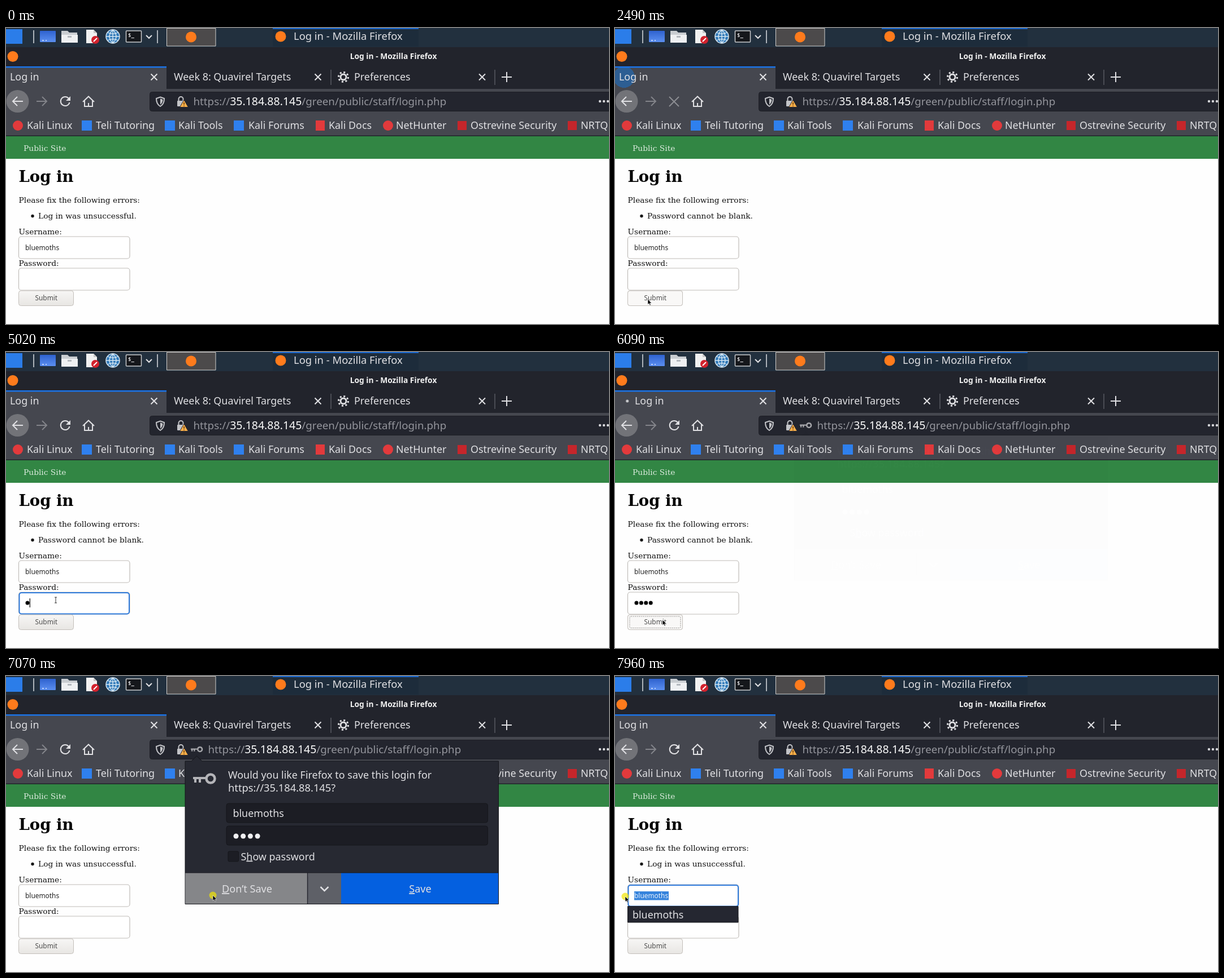
Animation, 1067 px wide and 525 px high, one loop 8 s. Source, as an HTML page:

```html
<!DOCTYPE html>
<html lang="en">
<head>
<meta charset="utf-8">
<title>Log in</title>
<style>
html, body { margin: 0; width: 100%; height: 100%; overflow: hidden; background: #fefefe; }
svg { display: block; width: 100%; height: 100%; }
text { font: 17.9px "Noto Sans", sans-serif; fill: #e0e0e3; white-space: pre; }
.page text { font: 13.78px "DejaVu Serif", serif; fill: #111; }
.page .ctl { font: 11.9px "Noto Sans", sans-serif; fill: #222; }
.page .h1 { font-size: 27.5px; font-weight: bold; fill: #000; }
.url { font-size: 18.75px; fill: #94959c; }
.ip { font-size: 19.5px; fill: #fafafa; }
.u { text-decoration: underline; }
.mid { text-anchor: middle; }
.line { fill: none; stroke: #e0e0e3; stroke-width: 2; }
.field { fill: #fff; stroke: #bfbcb8; stroke-width: 1.2; }
.ring { fill: none; stroke: #2f7bdc; stroke-width: 2; }

/* One loop is 8 s: 1% = 80 ms. Switches jump, motion is linear. */
.sw { animation: 8s step-end infinite; }
.mv { animation: 8s linear infinite; }
.fail { animation-name: fail; }
.blank { animation-name: blank; }
.hover { animation-name: hover; }
.btnfocus { animation-name: btnfocus; }
.pwfocus { animation-name: pwfocus; }
.caret { animation-name: caret; }
.d1 { animation-name: d1; }
.d2 { animation-name: d2; }
.d3 { animation-name: d3; }
.d4 { animation-name: d4; }
.stop { animation-name: stop; }
.reload { animation-name: reload; }
.busy { animation-name: busy; }
.spin { animation-name: spin; }
.label { animation-name: label; }
.burst { animation-name: burst; }
.popup { animation-name: popup; }
.key { animation-name: key; }
.shift { animation-name: shift; }
.decline { animation-name: decline; }
.userfocus { animation-name: userfocus; }
.list { animation-name: list; }
.select { animation-name: select; }
.pointer { animation-name: pointer; }
.shown { animation-name: shown; }
.arrow { animation-name: arrow; }
.beam { animation-name: beam; }
.press { animation-name: press; }

@keyframes fail { 0%, 78.75%, 100% { opacity: 1 } 30.25% { opacity: 0 } }
@keyframes blank { 0%, 78.75%, 100% { opacity: 0 } 30.25% { opacity: 1 } }
@keyframes hover { 0%, 36.8%, 79.6%, 100% { opacity: 0 } 18.6%, 73.4% { opacity: 1 } }
@keyframes btnfocus { 0%, 78.75%, 100% { opacity: 0 } 74.375% { opacity: 1 } }
@keyframes pwfocus { 0%, 74.375%, 100% { opacity: 0 } 49.375% { opacity: 1 } }
@keyframes caret {
  0% { transform: none }
  62.75% { transform: translateX(8px) }
  64.375% { transform: translateX(16.4px) }
  66.875% { transform: translateX(24.8px) }
  68.5%, 100% { transform: translateX(33.2px) }
}
@keyframes d1 { 0%, 78.75%, 100% { opacity: 0 } 62.75% { opacity: 1 } }
@keyframes d2 { 0%, 78.75%, 100% { opacity: 0 } 64.375% { opacity: 1 } }
@keyframes d3 { 0%, 78.75%, 100% { opacity: 0 } 66.875% { opacity: 1 } }
@keyframes d4 { 0%, 78.75%, 100% { opacity: 0 } 68.5% { opacity: 1 } }
@keyframes stop { 0%, 39.25%, 100% { opacity: 0 } 27.625% { opacity: 1 } }
@keyframes reload { 0%, 39.25%, 100% { opacity: 1 } 27.625% { opacity: 0 } }
@keyframes busy { 0%, 30.25%, 78.75%, 100% { opacity: 0 } 27.625%, 76.125% { opacity: 1 } }
@keyframes label { 0%, 30.25%, 78.75%, 100% { transform: none } 27.625%, 76.125% { transform: translateX(28px) } }
@keyframes spin {
  0%, 27.6%, 30.3%, 76.1% { transform: translateX(13px) }
  29%, 77.875%, 78.75% { transform: none }
  100% { transform: translateX(13px) }
}
@keyframes burst {
  0%, 30.24%, 36.5%, 78.74%, 83%, 100% { opacity: 0; transform: scale(.3) }
  30.25%, 78.75% { opacity: .45; transform: scale(.3) }
  31.125%, 79.6% { opacity: .39; transform: scale(.97) }
  32%, 80.4% { opacity: .37; transform: scale(1.1) }
  36.4%, 82.9% { opacity: 0; transform: scale(12) }
}
@keyframes popup { 0%, 76.125%, 91%, 100% { opacity: 0 } 77.4%, 89.25% { opacity: 1 } }
@keyframes key { 0%, 91%, 100% { opacity: 0 } 76.125% { opacity: 1 } }
@keyframes shift { 0%, 91%, 100% { transform: none } 76.125% { transform: translateX(26px) } }
@keyframes decline { 0%, 100% { opacity: 0 } 85% { opacity: 1 } }
@keyframes userfocus { 0% { opacity: 0 } 95.25%, 100% { opacity: 1 } }
@keyframes list { 0% { opacity: 0 } 96.75%, 100% { opacity: 1 } }
@keyframes select { 0%, 95.25% { transform: translateX(61px) } 98.5%, 100% { transform: none } }
@keyframes shown { 0% { opacity: 0 } 3%, 100% { opacity: 1 } }
@keyframes arrow { 0%, 72.6%, 98.5%, 100% { opacity: 1 } 42%, 91% { opacity: 0 } }
@keyframes beam { 0%, 72.6%, 98.5%, 100% { opacity: 0 } 42%, 91% { opacity: 1 } }
@keyframes press {
  0%, 27.625%, 51.125%, 76.125%, 89.25% { opacity: 0 }
  25.875%, 49.375%, 74.375%, 88.375%, 95.25%, 100% { opacity: .7 }
}
@keyframes pointer {
  0%, 3% { transform: translate(953px, 518px) }
  6.5% { transform: translate(520px, 496px) }
  9.5% { transform: translate(230px, 478px) }
  12.5%, 15.7% { transform: translate(139px, 475px) }
  15.75%, 16.625% { transform: translate(143px, 485px) }
  19.5% { transform: translate(104px, 488px) }
  25%, 35.5% { transform: translate(58px, 481px) }
  40% { transform: translate(84px, 430px) }
  45%, 45.875% { transform: translate(95px, 398px) }
  49.375%, 71.75% { transform: translate(88px, 440px) }
  74%, 78.75% { transform: translate(84px, 475px) }
  81.375% { transform: translate(160px, 405px) }
  86.5% { transform: translate(362px, 386px) }
  88.375%, 89.25% { transform: translate(366px, 389px) }
  91%, 93.5% { transform: translate(150px, 391px) }
  95.25% { transform: translate(95px, 390px) }
  98.5% { transform: translate(34px, 391px) }
  99.4%, 100% { transform: translate(18px, 391px) }
}
</style>
</head>
<body>
<svg viewBox="0 0 1067 525" preserveAspectRatio="none">
<defs>
  <linearGradient id="btn" x2="0" y2="1"><stop stop-color="#f7f6f5"/><stop offset="1" stop-color="#e8e6e3"/></linearGradient>
  <linearGradient id="desk" x2="0" y2="1"><stop stop-color="#2f62cf"/><stop offset="1" stop-color="#5b8ff0"/></linearGradient>
  <clipPath id="tab"><path d="M0 70H284V108H0Z"/></clipPath>
  <clipPath id="sel"><rect class="mv select" x="34" y="380" width="61" height="20"/></clipPath>
  <path id="x" d="M-5.5-5.5L5.5 5.5M5.5-5.5L-5.5 5.5"/>
  <g id="keyicon" fill="none" stroke="#b4b4b8">
    <circle cx="31" cy="0" r="7.5" stroke-width="4.5"/>
    <path d="M0-1H22M4-1V7M12-1V7" stroke-width="4"/>
  </g>
</defs>

<!-- desktop panel -->
<path fill="#22303e" d="M0 0H1067V34H0Z"/>
<path fill="#1d2c3b" d="M472 0H730V33H472Z"/>
<path fill="#1c6ad0" d="M472 0H730V2H472Z"/>
<path fill="#2b7de9" d="M0 2H29V28H0Z"/>
<path stroke="#aeb4ba" stroke-width="2" d="M49 4V27M268 4V27"/>
<rect x="60" y="5" width="28" height="20" rx="1" fill="url(#desk)"/>
<path stroke="#dce7ff" stroke-width="1.5" d="M64 22H67M70 22H72"/>
<path fill="#c9cdd1" d="M98 5H109L112 8H126V26H98Z"/>
<path fill="#eef0f2" d="M98 12H127V26H98Z"/>
<path fill="#b3b8bd" d="M109 14H116V17H109Z"/>
<path fill="#f1f1f1" d="M142 3H155L161 9V27H142Z"/>
<path fill="#c7c7c7" d="M155 3V9H161Z"/>
<circle cx="158" cy="21" r="7" fill="#d2222d"/>
<path stroke="#fff" stroke-width="2" d="M155 24L161 18"/>
<circle cx="189" cy="15" r="12" fill="#2f78b8" stroke="#d5e6f2" stroke-width="1.5"/>
<path class="line" style="stroke:#d5e6f2;stroke-width:1.4" d="M177 15H201M189 3V27M180 8Q189 13 198 8M180 22Q189 17 198 22M189 3Q177 15 189 27M189 3Q201 15 189 27"/>
<rect x="212.5" y="5" width="27" height="20" rx="1" fill="#15171b" stroke="#c9cbce" stroke-width="1.5"/>
<text x="216" y="16" style="font:bold 9px 'Noto Sans Mono',monospace">$_</text>
<path class="line" d="M248 13L253 18L258 13"/>
<path fill="#4c4a4b" stroke="#d0cfcd" d="M284.5 .5H371V32H284.5Z"/>
<g fill="#ff7b1c">
  <circle cx="327.5" cy="16" r="9.5"/>
  <circle cx="486" cy="15" r="9.5"/>
</g>
<text x="509" y="21" style="font-size:18.4px">Log in - Mozilla Firefox</text>

<!-- window title and tabs -->
<path fill="#22242c" d="M0 34H1067V108H0Z"/>
<circle cx="12" cy="50.5" r="9.5" fill="#ff7b1c"/>
<text class="mid" x="685.5" y="55.3" style="font-size:13.8px;font-weight:bold;fill:#f1f1f1">Log in - Mozilla Firefox</text>
<path fill="#45474f" d="M0 69H284V108H0Z"/>
<path fill="#1a73e8" d="M0 68H284V70.5H0Z"/>
<g clip-path="url(#tab)">
  <g transform="translate(16 87)"><circle class="mv burst" r="19.5" fill="#0a84ff"/></g>
</g>
<g class="sw busy"><circle class="mv spin" cx="9" cy="87" r="2.5" fill="#c9cacd"/></g>
<text class="sw label" x="7" y="93">Log in</text>
<text x="297" y="93">Week 8: Quavirel Targets</text>
<text x="616" y="93">Preferences</text>
<g class="line">
  <use href="#x" x="262" y="87"/>
  <use href="#x" x="552" y="87"/>
  <use href="#x" x="842.5" y="87"/>
  <path d="M877 87H895M886 78V96"/>
  <path stroke="#585a62" stroke-width="1.5" d="M575 74V101M865 74V101"/>
  <circle cx="597" cy="87" r="5" stroke-width="3"/>
  <circle cx="597" cy="87" r="8.5" stroke-width="3" stroke-dasharray="3 3.676"/>
</g>

<!-- navigation -->
<path fill="#45474f" d="M0 108H1067V191H0Z"/>
<circle cx="20.5" cy="130" r="20" fill="#727378"/>
<path class="line" d="M30 130H12M20 122L12 130L20 138"/>
<path class="line" style="stroke:#83848a" d="M54 130H72M64 122L72 130L64 138"/>
<g class="sw reload">
  <path class="line" d="M111 125A8 8 0 1 0 112.5 132"/>
  <path fill="#e0e0e3" d="M114 121V129H106Z"/>
</g>
<g class="sw stop"><path class="line" style="stroke:#8d8e93" d="M96 122L113 139M113 122L96 139"/></g>
<path class="line" d="M136 131L146 121.5L156 131M139 129V139H153V129M146 139V133"/>
<rect x="254.5" y="113.5" width="830" height="34" rx="4" fill="#23252e" stroke="#1d1e25"/>
<path class="line" style="stroke:#c3c4c8" d="M273 122.5L280 125Q280 135 273 139Q266 135 266 125Z"/>
<path fill="#c3c4c8" d="M273 125L277.5 127Q277 133 273 136Z"/>
<rect x="303" y="129" width="13" height="10" rx="1" fill="#c3c4c8"/>
<path class="line" style="stroke:#c3c4c8" d="M305.5 129V126A4 4 0 0 1 313.5 126V129"/>
<path fill="#ffb04a" stroke="#23252e" d="M315 127.5L322.5 140.5H307.5Z"/>
<path stroke="#5a3505" stroke-width="1.5" d="M315 132V136M315 137.5V139"/>
<g class="sw key"><use href="#keyicon" transform="translate(327 130) scale(.52)"/></g>
<text class="url sw shift" x="331.5" y="137">https://<tspan class="ip">35.184.88.145</tspan>/green/public/staff/login.php</text>
<g fill="#d5d5d9"><circle cx="1051" cy="130" r="2.2"/><circle cx="1058" cy="130" r="2.2"/><circle cx="1065" cy="130" r="2.2"/></g>

<!-- bookmarks -->
<g fill="#e23a3c">
  <circle cx="21" cy="173" r="9"/>
  <path d="M548 164H564V182H548Z"/>
  <circle cx="676" cy="173" r="9"/>
  <path fill="#c5262b" d="M799 165H815V181H799ZM994 165H1010V181H994Z"/>
  <path fill="#2f80ee" d="M134 164H152V182H134ZM281 164H299V182H281ZM403 164H421V182H403Z"/>
</g>
<g>
  <text x="37" y="178.5">Kali Linux</text>
  <text x="159" y="178.5">Teli Tutoring</text>
  <text x="305" y="178.5">Kali Tools</text>
  <text x="429" y="178.5">Kali Forums</text>
  <text x="571" y="178.5">Kali Docs</text>
  <text x="690" y="178.5">NetHunter</text>
  <text x="822" y="178.5">Ostrevine Security</text>
  <text x="1017" y="178.5">NRTQ</text>
</g>

<!-- page -->
<g class="page">
  <path fill="#fefefe" d="M0 191H1067V525H0Z"/>
  <path fill="#328644" d="M0 191H1067V232H0Z"/>
  <path fill="#22252a" d="M0 190.5H1067V192H0Z"/>
  <text x="31" y="217.5" style="fill:#dcebde">Public Site</text>
  <text class="h1" x="22.5" y="273">Log in</text>
  <text x="22.5" y="310">Please fix the following errors:</text>
  <circle cx="47" cy="333.5" r="2.7" fill="#111"/>
  <text class="sw fail" x="57" y="337.5">Log in was unsuccessful.</text>
  <text class="sw blank" x="57" y="337.5">Password cannot be blank.</text>
  <text x="22.5" y="366">Username:</text>
  <text x="22.5" y="421.5">Password:</text>
  <rect class="field" x="22.5" y="370" width="196.5" height="39" rx="4.5"/>
  <rect class="field" x="22.5" y="426" width="196.5" height="39" rx="4.5"/>
  <text class="ctl" x="34" y="393.5">bluemoths</text>

  <g class="sw pwfocus">
    <rect class="ring" x="23.5" y="427" width="194.5" height="37.5" rx="4"/>
    <path class="sw caret" stroke="#000" stroke-width="1.2" d="M34.3 437V453"/>
  </g>
  <g fill="#000">
    <circle class="sw d1" cx="38" cy="445" r="3.5"/>
    <circle class="sw d2" cx="46.4" cy="445" r="3.5"/>
    <circle class="sw d3" cx="54.8" cy="445" r="3.5"/>
    <circle class="sw d4" cx="63.2" cy="445" r="3.5"/>
  </g>

  <rect x="22.5" y="466" width="97" height="26.5" rx="4" fill="url(#btn)" stroke="#c3bfba"/>
  <rect class="sw hover" x="22.5" y="466" width="97" height="26.5" rx="4" fill="#f9f8f7" stroke="#c3bfba"/>
  <rect class="sw btnfocus" x="26" y="469" width="90" height="20.5" rx="2" fill="none" stroke="#8f8d8a" stroke-dasharray="2 1.5"/>
  <text class="ctl mid" x="71.3" y="483.3" style="fill:#4c4c4c">Submit</text>

  <g class="sw userfocus">
    <rect class="ring" x="23.5" y="371" width="194.5" height="37.5" rx="4"/>
    <g clip-path="url(#sel)">
      <path fill="#3583dc" d="M34 382H95V397.5H34Z"/>
      <text class="ctl" x="34" y="393.5" style="fill:#e8f1fc">bluemoths</text>
    </g>
  </g>
</g>
<g class="sw list">
  <path fill="#252731" stroke="#17181d" d="M22.5 408.5H218V437H22.5Z"/>
  <text x="31" y="430">bluemoths</text>
</g>

<!-- save-login prompt -->
<g class="mv popup">
  <path fill="#272932" stroke="#15161b" d="M317 151H328L337.5 142L347 151H871.5V404.5H317Z"/>
  <use href="#keyicon" transform="translate(331 182)"/>
  <text x="393" y="182">Would you like Firefox to save this login for</text>
  <text x="393" y="205" style="font-size:18.3px">https://35.184.88.145?</text>
  <g fill="#1c1d24" stroke="#15161b">
    <rect x="390" y="226" width="462.5" height="34" rx="4"/>
    <rect x="390" y="266" width="462.5" height="34" rx="4"/>
    <rect x="393" y="311" width="18.5" height="18" rx="2"/>
  </g>
  <text x="401.5" y="250">bluemoths</text>
  <g fill="#f1f1f3">
    <circle cx="407" cy="284" r="4.5"/><circle cx="419.7" cy="284" r="4.5"/>
    <circle cx="432.4" cy="284" r="4.5"/><circle cx="445.1" cy="284" r="4.5"/>
  </g>
  <text x="415.5" y="326.5">S<tspan class="u">h</tspan>ow password</text>
  <path fill="#5e6067" d="M317.5 349H593V404H317.5Z"/>
  <path stroke="#23252e" stroke-width="1.3" d="M533.5 356V396"/>
  <g class="sw decline">
    <path fill="#858689" d="M317.5 349H533V404H317.5Z"/>
    <path stroke="#23252e" stroke-width="1.3" d="M533.5 349V404"/>
  </g>
  <path fill="#0460e0" d="M593 349H871V404H593Z"/>
  <path stroke="#1a1b21" d="M317 349H871"/>
  <text class="mid" x="426.5" y="384" style="font-size:18.1px"><tspan class="u">D</tspan>on’t Save</text>
  <text class="mid" x="733" y="384" style="font-size:18.1px"><tspan class="u">S</tspan>ave</text>
  <path class="line" style="stroke-width:2.5" d="M556.5 374L563.5 381L570.5 374"/>
</g>

<!-- mouse pointer -->
<g class="sw shown">
  <g class="mv pointer">
    <circle class="sw press" r="6.5" fill="#f2e500" opacity="0"/>
    <path class="sw arrow" fill="#000" stroke="#fff" stroke-width=".6" d="M0 0V9.5L2.2 7.5L3.8 11L5.3 10.3L3.8 7H6.8Z"/>
    <path class="sw beam" fill="none" stroke="#333" d="M-2-5H2M0-5V5M-2 5H2"/>
  </g>
</g>
</svg>
</body>
</html>
```
